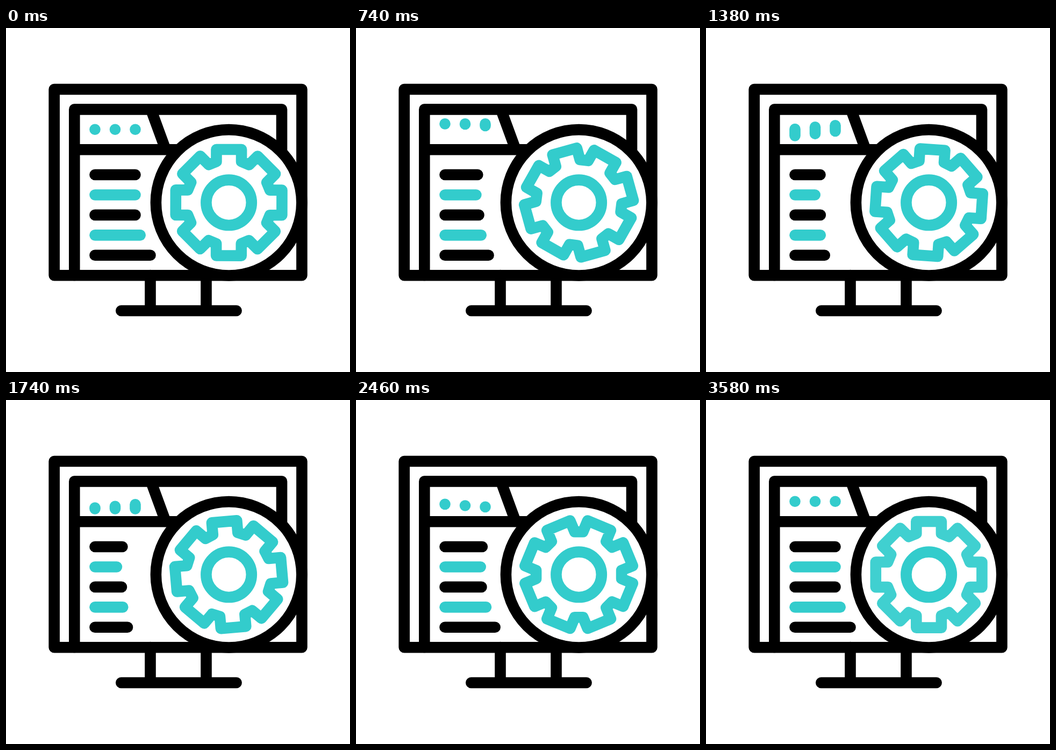
An HTML page that plays this animation: 640x640 px, repeating every 3600 ms.

```html
<!DOCTYPE html>
<html lang="en">
<head>
<meta charset="utf-8">
<title>Monitor with gear</title>
<style>
  html, body { margin: 0; width: 100%; height: 100%; overflow: hidden; background: #fff; }
  svg { display: block; width: 100vw; height: 100vh; }
  svg * { fill: none; stroke: #000; stroke-width: 20.6; stroke-linecap: round; stroke-linejoin: round; }
  .teal, .teal * { stroke: #33cccc; }
  .lens { fill: #fff; }
</style>
</head>
<body>
<svg viewBox="0 0 640 640">
  <path d="M268.5 460V526M372.5 460V526M214.3 526H428.6"/>
  <rect x="89.7" y="114" width="460.7" height="346.3"/>
  <path d="M127.3 460V151.4H513V229M127.3 226.2H320M269.6 151.4L297 226.2"/>
  <g id="bars"></g>
  <g id="dots" class="teal"></g>
  <circle class="lens" cx="414.6" cy="324.8" r="135.7"/>
  <g class="teal" transform="translate(414.6 324.8)">
    <circle r="42.2"/>
    <path id="gear"/>
  </g>
</svg>
<script>
const LOOP = 3600, SPIN = 3580;
const LEFT = 165.5;
const REST = 188.7, HIGH = 178.4, LOW = 202.4;

const $ = id => document.getElementById(id);

function addPath(parent, className = '') {
  const path = document.createElementNS('http://www.w3.org/2000/svg', 'path');
  path.setAttribute('class', className);
  return parent.appendChild(path);
}

// Eased progress from time a to time b.
function ease(t, a, b) {
  const u = Math.min(1, Math.max(0, (t - a) / (b - a)));
  return u * u * (3 - 2 * u);
}

// right end, shrink amount, start, shortest, end
const bars = [
  [240.5, 28, 86, 1385, 2895],
  [240.5, 38.2, 111, 1465, 2911],
  [240.5, 28, 139, 1470, 2944],
  [249.7, 37, 139, 1415, 2897],
  [268.5, 48, 122, 1435, 2883]
].map(([right, shrink, start, mid, end], i) => ({
  right, shrink, start, mid, end,
  y: 273 + i * 37.45,
  el: addPath($('bars'), i % 2 ? 'teal' : '')
}));

const dots = [0, 1, 2].map(i => ({
  x: 165.5 + i * 37.5,
  delay: i * 100,
  el: addPath($('dots'))
}));

function gearOutline() {
  const tooth = [[-23.3, -76.4], [-23.3, -98.8], [23.3, -98.8], [23.3, -76.4]];
  const points = [];
  for (let i = 0; i < 8; i++) {
    const c = Math.cos(i * Math.PI / 4), s = Math.sin(i * Math.PI / 4);
    for (const [x, y] of tooth) {
      points.push(`${(x * c - y * s).toFixed(2)} ${(x * s + y * c).toFixed(2)}`);
    }
  }
  return `M${points.join('L')}Z`;
}

// One end of a dot: up, down, then back to rest.
function dotEnd(t, up, down) {
  return REST
    + (HIGH - REST) * ease(t, ...up)
    + (LOW - HIGH) * ease(t, ...down)
    + (REST - LOW) * ease(t, 2000, 2790);
}

function draw(t) {
  for (const b of bars) {
    const amount = ease(t, b.start, b.mid) - ease(t, b.mid, b.end);
    b.el.setAttribute('d', `M${LEFT} ${b.y}H${b.right - b.shrink * amount}`);
  }
  for (const d of dots) {
    const local = t - d.delay;
    const top = dotEnd(local, [0, 400], [985, 1900]);
    const bottom = dotEnd(local, [300, 700], [800, 1500]);
    d.el.setAttribute('d', `M${d.x} ${top}V${bottom + 0.01}`);
  }
  $('gear').setAttribute('transform', `rotate(${Math.min(t / SPIN, 1) * 360})`);
  $('gear').style.stroke = t >= SPIN ? '#40d0d0' : '';
}

function tick() {
  draw(performance.now() % LOOP);
  requestAnimationFrame(tick);
}

$('gear').setAttribute('d', gearOutline());
tick();
</script>
</body>
</html>
```
